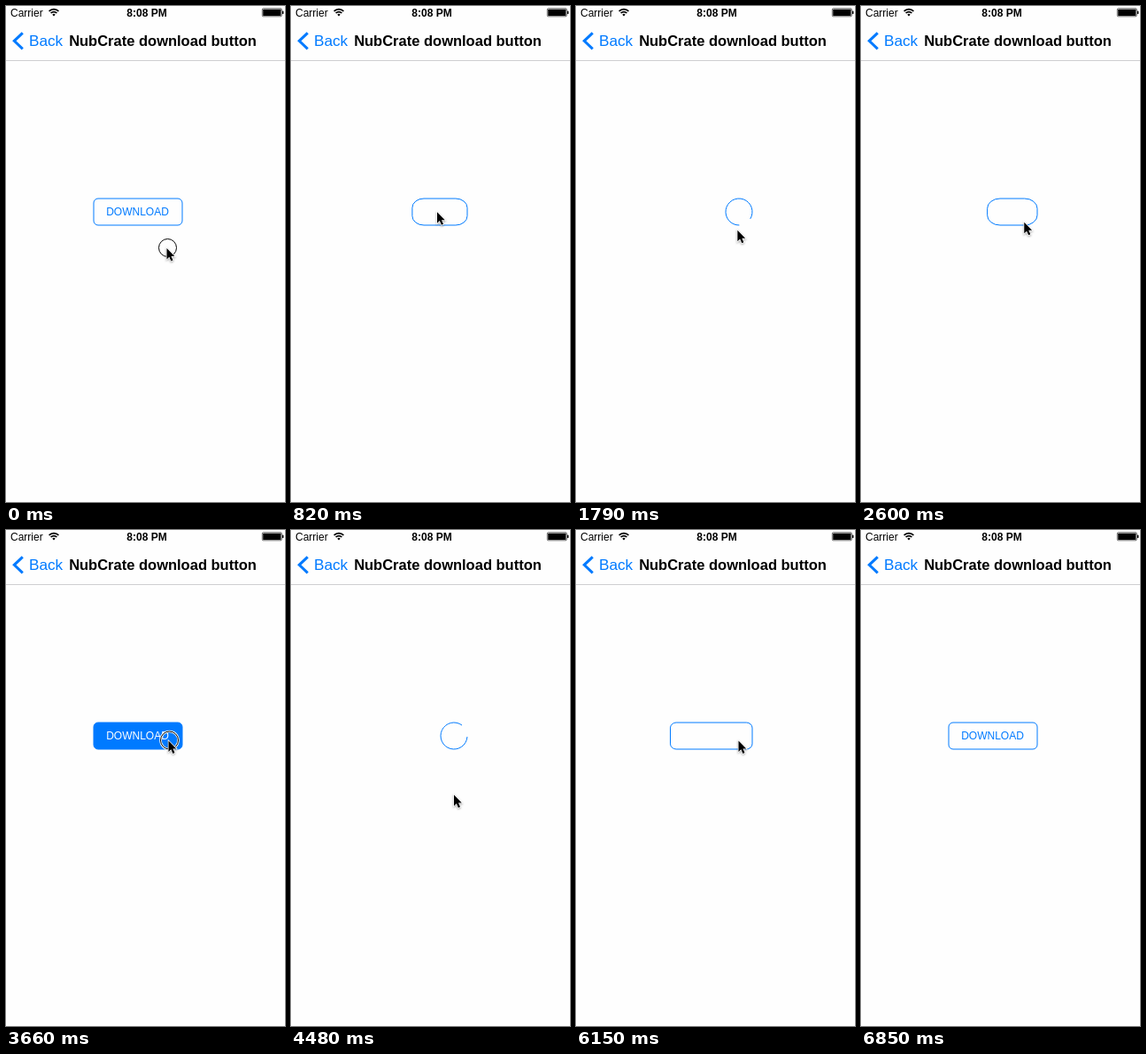
An HTML page for the animation above (7290 ms loop, 315x559 px).

```html
<!DOCTYPE html>
<html lang="en">
<head>
<meta charset="utf-8">
<title>Download button</title>
<style>
  html, body { margin: 0; width: 100%; height: 100%; overflow: hidden; background: #fefefe; }
  svg { display: block; width: 315px; height: 559px; }
  text { font-family: "Liberation Sans", Arial, sans-serif; }
  .small { font-size: 12px; }
  .bold { font-weight: bold; }
  .blue { fill: #007aff; }
  .line { fill: none; stroke: #007aff; }
  #cursor { filter: drop-shadow(0 1px 1px rgba(0, 0, 0, .35)); }
</style>
</head>
<body>
<svg viewBox="0 0 315 559">
  <rect width="315" height="559" fill="#fefefe"/>

  <text class="small" x="5" y="11.5">Carrier</text>
  <g fill="none" stroke="#000" stroke-width="1.7">
    <path d="M48.6 5.8a7.6 7.6 0 0 1 10.8 0M50.6 8a4.8 4.8 0 0 1 6.8 0"/>
    <path d="M54 11.6l-1.7-1.9a2.4 2.4 0 0 1 3.4 0z" fill="#000" stroke="none"/>
  </g>
  <text class="small bold" x="159" y="11.5" text-anchor="middle">8:08 PM</text>
  <rect x="289.3" y="2.8" width="22" height="9" rx="1.2" fill="none" stroke="#000" stroke-width=".6"/>
  <rect x="290.2" y="3.7" width="20.2" height="7.2" rx=".5"/>
  <rect x="312" y="5.5" width="1.4" height="3.5" rx=".6"/>

  <path class="line" d="M18.8 30.3L9.3 39.3L18.8 48.3" stroke-width="3"/>
  <text class="blue" x="26" y="45" font-size="17.2">Back</text>
  <text class="bold" x="177" y="45" font-size="16.5" text-anchor="middle">NubCrate download button</text>
  <path d="M0 61.5H315" stroke="#cfcfd1"/>

  <rect id="button" y="217" height="30" stroke="#007aff"/>
  <text id="label" class="small" x="148.5" y="235.5" text-anchor="middle">DOWNLOAD</text>
  <path id="spinner" class="line"/>

  <g id="ring" fill="none">
    <circle r="10" stroke="#fff" stroke-width="2.6"/>
    <circle r="10" stroke="#000"/>
  </g>
  <path id="cursor" d="M0 0V12.4L2.8 9.8L4.9 14.5L7 13.5L5 9H8.8Z"
        stroke="#fff" stroke-width="1.5" paint-order="stroke"/>
</svg>

<script>
const LOOP = 7290, TAP = 78, MORPH = 290, EXIT = 6850;
const BLUE = '#007aff';
const WIDE = 100, ROUND = 30, RIGHT = 199, RADIUS = ROUND / 2;
const CENTER = { x: RIGHT - RADIUS, y: 232 };
const GAP = 57, SPIN_RATE = .37, SPIN_OFFSET = -484;

// Each run goes from the tap on the button to the end of the tap that cancels.
const runs = [{ press: 590, stop: 2480 }, { press: 3660, stop: 5920 }];

const start = { x: 181.5, y: 273 };
const onLabel = { x: 165, y: 232.3 };
const onSpinner = { x: 183.5, y: 237.5 };
const moves = [
  { from: 60, to: 350, place: onLabel },
  { from: 1000, to: 1500, place: { x: 181, y: 271 } },
  { from: 1500, to: 2050, place: onSpinner },
  { from: 2500, to: 2700, place: { x: 185, y: 250 } },
  { from: 3070, to: 3240, place: onSpinner },
  { from: 3800, to: 4300, place: { x: 184, y: 298.5 } },
  { from: 4600, to: 5400, place: onSpinner },
  { from: 6450, to: EXIT, place: { x: 282, y: 566 } }
];

const $ = id => document.getElementById(id);
const button = $('button'), label = $('label'), spinner = $('spinner');
const ring = $('ring'), cursor = $('cursor');

const mix = (a, b, k) => a + (b - a) * k;
const within = (t, from, to) => t >= from && t < to;
const ease = (t, from, to) => {
  const k = Math.max(0, Math.min(1, (t - from) / (to - from)));
  return k * k * (3 - 2 * k);
};
const show = (el, on) => el.setAttribute('visibility', on ? 'visible' : 'hidden');
const set = (el, attrs) => {
  for (const key in attrs) el.setAttribute(key, attrs[key]);
};

// Angles run clockwise from the top.
function arc(from, sweep) {
  const point = deg => {
    const a = deg * Math.PI / 180;
    return `${CENTER.x + RADIUS * Math.sin(a)} ${CENTER.y - RADIUS * Math.cos(a)}`;
  };
  return `M${point(from)}A${RADIUS} ${RADIUS} 0 1 1 ${point(from + sweep)}`;
}

function drawButton(t) {
  const run = runs.find(r => within(t, r.press, r.stop + MORPH));
  const release = run && run.press + TAP;
  const pressed = !!run && t < release;
  const spinning = !!run && within(t, release + MORPH, run.stop);
  const shrink = run
    ? ease(t, release, release + MORPH) - ease(t, run.stop, run.stop + MORPH)
    : 0;
  const width = mix(WIDE, ROUND, shrink);
  set(button, {
    x: RIGHT - width, width,
    rx: Math.min(RADIUS, 5 + 15 * shrink),
    ry: mix(5, RADIUS, shrink),
    fill: pressed ? BLUE : 'none'
  });
  label.setAttribute('fill', pressed ? '#fff' : BLUE);
  show(button, !spinning);
  show(label, !run || pressed);
  show(spinner, spinning);
  spinner.setAttribute('d', arc(SPIN_RATE * t + SPIN_OFFSET, 360 - GAP));
}

function drawPointer(t) {
  let { x, y } = start;
  for (const { from, to, place } of moves) {
    const k = ease(t, from, to);
    x = mix(x, place.x, k);
    y = mix(y, place.y, k);
  }
  const touching = t < 60 || runs.some(r =>
    within(t, r.press, r.press + TAP) || within(t, r.stop - TAP, r.stop));
  cursor.setAttribute('transform', `translate(${x} ${y})`);
  ring.setAttribute('transform', `translate(${x + 1} ${y - .5})`);
  show(cursor, t < EXIT);
  show(ring, touching);
}

const began = performance.now();
function tick() {
  const t = (performance.now() - began) % LOOP;
  drawButton(t);
  drawPointer(t);
  requestAnimationFrame(tick);
}
tick();
</script>
</body>
</html>
```
